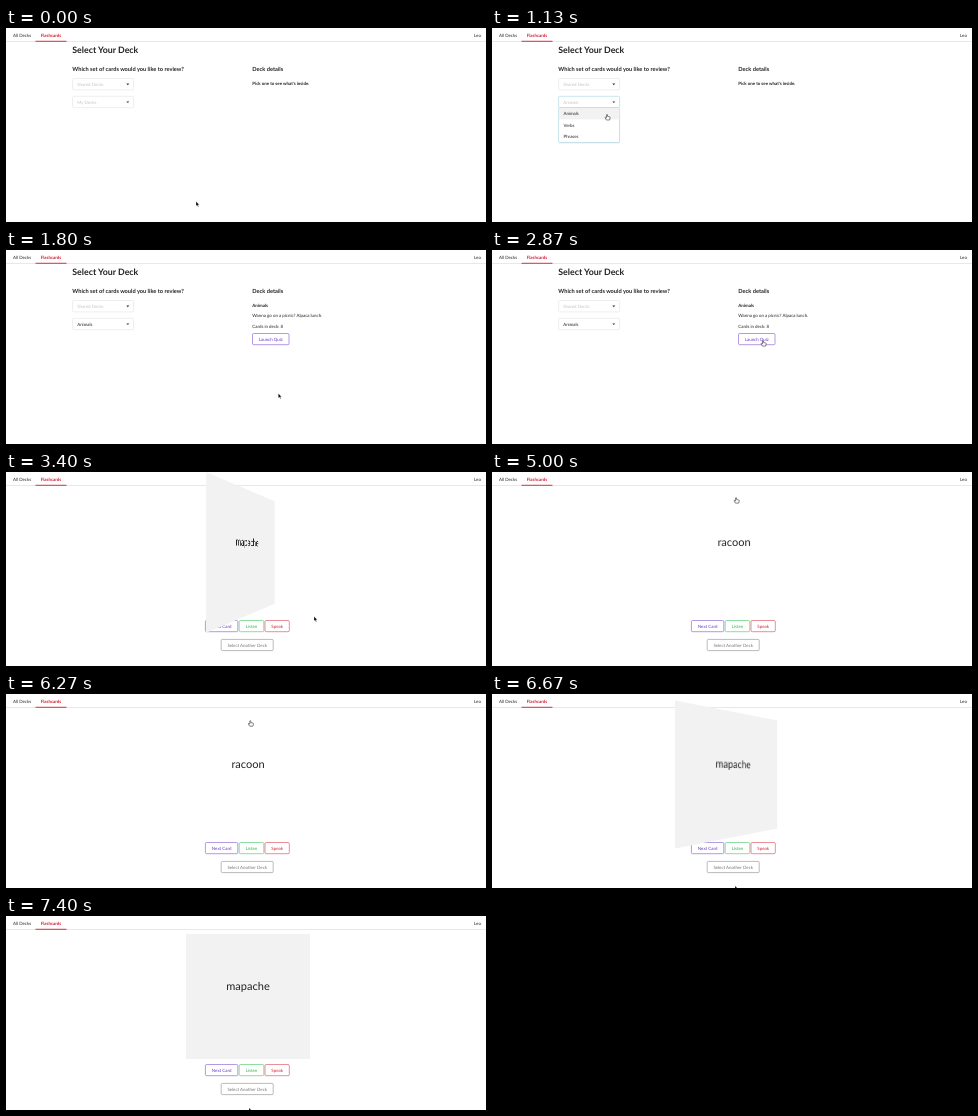
An HTML page that plays this animation: 480 by 194 pixels, repeating every 7.47 s.

```html
<!DOCTYPE html>
<html lang="en">
<head>
<meta charset="utf-8">
<title>Flashcards</title>
<style>
  html, body { margin: 0; width: 100%; height: 100%; overflow: hidden; background: #fff; }
  #stage { position: relative; width: 480px; height: 194px; overflow: hidden; }
  svg { position: absolute; left: 0; top: 0; width: 480px; height: 194px; }
  text, .face { font-family: Lato, sans-serif; text-rendering: geometricPrecision; fill: #222; color: #222; }
  text { font-size: 4.41px; }
  .bold { font-weight: 700; }
  .faded { fill: #c4c4c4; }
  .title { font-size: 8.82px; }
  .heading { font-size: 5.67px; }
  .face {
    position: absolute; left: 180px; top: 18px; width: 124px; height: 125px;
    font-size: 11.03px; line-height: 106px; text-align: center;
    backface-visibility: hidden;
  }
  #front { background: #f2f2f2; }
</style>
</head>
<body>
<div id="stage">
  <svg id="page" viewBox="0 0 480 194"></svg>
  <div class="face" id="front">mapache</div>
  <div class="face" id="back">racoon</div>
  <svg id="pointer" viewBox="0 0 480 194">
    <path id="arrow" d="M0 0V4.5L1.1 3.6 1.9 5.3 2.7 4.9 1.9 3.3H3.3Z" fill="#000" stroke="#fff" stroke-width=".3"/>
    <path id="hand" d="M-.5 .5Q0-.4 .5 .5V2.2L2.8 2.7Q3.3 2.9 3.1 3.8L2.6 5.8H-.6L-2 3.6Q-2 2.8-1.2 3.1L-.5 3.7Z"
      fill="#fff" stroke="#222" stroke-width=".55" stroke-linejoin="round"/>
  </svg>
</div>
<script>
const LOOP = 7470, FPS = 15, FLIP = 600;
const VIOLET = '#6435c9', GREEN = '#21ba45', RED = '#d01f35', GREY = '#767676';
const $ = id => document.getElementById(id);

// Markup helpers
const text = (x, y, label, cls = '', attrs = '') =>
  `<text x="${x}" y="${y}" class="${cls}" ${attrs}>${label}</text>`;
const box = (x, y, w, h, stroke, fill = '#fff') =>
  `<rect x="${x}" y="${y}" width="${w}" height="${h}" rx="1.2" fill="${fill}" stroke="${stroke}" stroke-width=".5"/>`;
const button = (x, y, w, label, color) =>
  box(x, y, w, 11.2, color) +
  text(x + w / 2, y + 7.1, label, '', `text-anchor="middle" style="fill:${color}"`);
const dropdown = (y, label, cls, border) =>
  box(66.6, y, 61, 11.4, border) + text(71.2, y + 7.3, label, cls) +
  `<path d="M120.3 ${y + 5.1}h3l-1.5 1.7z" fill="#333"/>`;

const header =
  '<rect y="13.1" width="480" height=".6" fill="#d8d8d8"/>' +
  `<rect x="29.5" y="12.8" width="31" height=".9" fill="${RED}"/>` +
  text(7, 8.5, 'All Decks') +
  text(34.7, 8.5, 'Flashcards', 'bold', `style="fill:${RED}"`) +
  text(468, 8.5, 'Leo');

const menu =
  '<rect x="66.9" y="80.2" width="61" height="35.3" rx="1" fill="#000" opacity=".08"/>' +
  box(66.6, 79.7, 61, 34.8, '#96c8da') +
  '<rect x="66.9" y="80" width="60.4" height="11.4" fill="#f2f2f2"/>' +
  ['Animals', 'Verbs', 'Phrases'].map((item, i) => text(71.5, 87.1 + i * 11.5, item)).join('');

const deckDetails =
  text(246.3, 57.2, 'Animals', 'bold') +
  text(246.3, 67.4, 'Wanna go on a picnic? Alpaca lunch.') +
  text(246.3, 77.6, 'Cards in deck: 8') +
  button(246.5, 83.5, 36.5, 'Launch Quiz', VIOLET);

function selectPage(t) {
  const open = t >= 660 && t < 1190, chosen = t >= 1120, closed = t >= 1190;
  const border = open ? '#96c8da' : t > 450 && t < 1190 ? '#aaa' : '#dcdcdc';
  return text(66.3, 25.4, 'Select Your Deck', 'bold title') +
    text(66.3, 42.6, 'Which set of cards would you like to review?', 'bold heading') +
    text(246.3, 42.6, 'Deck details', 'bold heading') +
    dropdown(50.5, 'Shared Decks', 'faded', '#dcdcdc') +
    dropdown(68.3, chosen ? 'Animals' : 'My Decks', closed ? '' : 'faded', border) +
    (open ? menu : '') +
    (closed ? deckDetails : text(246.3, 56.9, "Pick one to see what's inside.", 'bold'));
}

const quizPage =
  button(199.4, 148.5, 32.4, 'Next Card', VIOLET) +
  button(233.2, 148.5, 24.6, 'Listen', GREEN) +
  button(259, 148.5, 24.3, 'Speak', RED) +
  button(215.2, 167.4, 52, 'Select Another Deck', GREY);

// cubic-bezier(.25, .1, .25, 1), solved by bisection
function ease(x) {
  if (x <= 0) return 0;
  if (x >= 1) return 1;
  const curve = (s, a, b) => 3 * (1 - s) ** 2 * s * a + 3 * (1 - s) * s * s * b + s ** 3;
  let lo = 0, hi = 1;
  for (let i = 0; i < 20; i++) {
    const mid = (lo + hi) / 2;
    if (curve(mid, .25, .25) < x) lo = mid; else hi = mid;
  }
  return curve(lo, .1, 1);
}

// The card turns while hovered and turns back when the pointer leaves.
function cardAngle(t) {
  const enter = 3200, leave = 3355, reached = ease((leave - enter) / FLIP);
  if (t < leave) return 180 * ease((t - enter) / FLIP);
  if (t < 4531) return 180 * reached * (1 - ease((t - leave) / (FLIP * reached)));
  if (t < 6370) return 180 * ease((t - 4531) / FLIP);
  return 180 * (1 - ease((t - 6370) / FLIP));
}

// Pointer stops: time, x, y
const stops = [
  [0, 190, 173.5], [533, 118, 73], [800, 118, 73], [1133, 115, 86.2],
  [1533, 115, 86.2], [1800, 272.3, 143.5], [2333, 272.3, 143.5], [2867, 271, 90.3],
  [3200, 271, 90.3], [3400, 308, 144.5], [3533, 320.5, 173.5], [4133, 320.5, 173.5],
  [4333, 311, 184], [4600, 245, 28.3], [4933, 244, 25], [5133, 244.3, 26.2],
  [6200, 244.3, 26.2], [6267, 244.3, 26.4], [6533, 243, 191.8], [LOOP, 243, 191.8]
];
function pointerAt(t) {
  const i = stops.findIndex(s => s[0] > t);
  const [t0, x0, y0] = stops[i - 1], [t1, x1, y1] = stops[i];
  const u = (t - t0) / (t1 - t0), k = u * u * (3 - 2 * u);
  return [x0 + (x1 - x0) * k, y0 + (y1 - y0) * k];
}
function isHand(t, x, y) {
  const inside = (l, top, r, b) => x > l && x < r && y > top && y < b;
  if (t < 1190) return inside(66, 68, 128, t > 660 ? 115 : 80);
  if (t < 3190) return inside(246, 83, 283, 95);
  return inside(180, 18, 304, 143);
}

let shown = '';
function draw(t) {
  const quiz = t >= 3190;
  const markup = header + (quiz ? quizPage : selectPage(t));
  if (markup !== shown) $('page').innerHTML = shown = markup;

  const angle = cardAngle(t);
  ['front', 'back'].forEach((id, side) => {
    $(id).style.display = quiz ? 'block' : 'none';
    $(id).style.transform = `perspective(238px) rotateY(${angle + side * 180}deg)`;
  });

  const [x, y] = pointerAt(t), hand = isHand(t, x, y);
  $('pointer').style.transform = `translate(${x}px, ${y}px)`;
  $('pointer').style.overflow = 'visible';
  $('hand').style.display = hand ? '' : 'none';
  $('arrow').style.display = hand ? 'none' : '';
}

const start = performance.now();
function tick() {
  const elapsed = (performance.now() - start) % LOOP;
  draw(Math.floor(elapsed * FPS / 1000 + .1) * 1000 / FPS % LOOP);
  requestAnimationFrame(tick);
}
tick();
</script>
</body>
</html>
```
